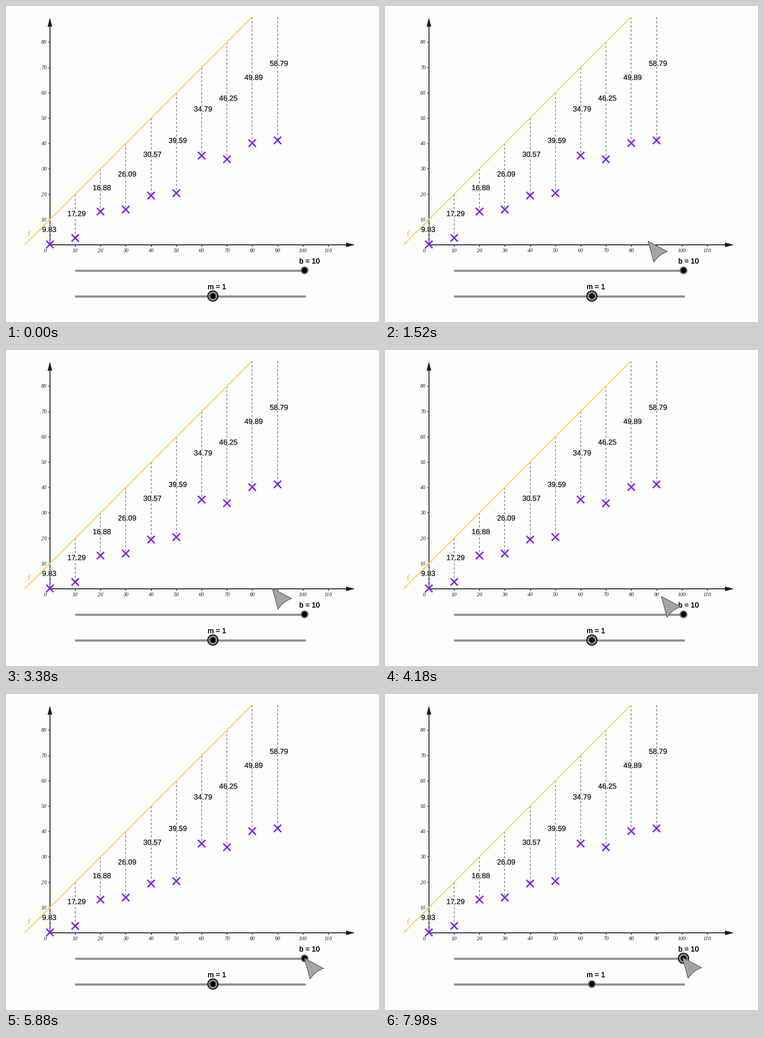
Recreate the animation shown at these times as a matplotlib script. Size 814 px wide and 688 px high, loop 8 s.

```python
import numpy as np
import matplotlib.pyplot as plt
from matplotlib.animation import FuncAnimation
from matplotlib.collections import LineCollection
from matplotlib.patches import Circle, PathPatch, Polygon
from matplotlib.path import Path
from matplotlib.patheffects import Stroke, withStroke

W, H, DPI = 814, 688, 64
PX = 72 / DPI                 # points per pixel
STEP, LOOP = 20, 8000
OX, OY, UNIT = 95.3, 519.5, 5.52
TOP = 23
BG, INK = "#fdfdfb", "#1c1c1c"

fig = plt.figure(figsize=(W / DPI, H / DPI), dpi=DPI, facecolor=BG)
ax = fig.add_axes([0, 0, 1, 1])
ax.set_xlim(-0.5, W - 0.5)    # whole numbers are pixel centres
ax.set_ylim(H - 0.5, -0.5)
ax.axis("off")


def sx(x):
    return OX + UNIT * x


def sy(y):
    return OY - UNIT * y


def lines(segs, color, width, z, cap="butt", style="solid"):
    ax.add_collection(LineCollection(segs, colors=color, linewidths=width * PX,
                                     linestyles=style, capstyle=cap, zorder=z),
                      autolim=False)


def number(x, y, text, ha="center"):
    ax.text(x, y, text, fontsize=12 * PX, color=INK, ha=ha, zorder=3,
            family="Liberation Serif", style="italic")


def label(x, y, text, color="black", z=6):
    effects = [Stroke(linewidth=2.2 * PX, foreground=BG),
               withStroke(linewidth=0.3 * PX, foreground=color)]
    ax.text(x, y, text, fontsize=16 * PX, color=color, zorder=z,
            family="Liberation Sans", path_effects=effects)


def disc(x, y, r, face, edge="none", width=0):
    return ax.add_patch(Circle((x, y), r, facecolor=face, edgecolor=edge,
                               linewidth=width * PX, zorder=9))


# Axes with arrows, ticks and numbers
lines([[(OX, OY), (746, OY)], [(OX, OY), (OX, 40)]], INK, 2, 2)
for (x, y), (dx, dy) in (((761, OY), (1, 0)), ((OX, 25), (0, -1))):
    bx, by = x - 19.5 * dx, y - 19.5 * dy
    ax.add_patch(Polygon([(x, y), (bx + 5 * dy, by + 5 * dx),
                          (bx - 5 * dy, by - 5 * dx)],
                         facecolor=INK, edgecolor="none", zorder=2))

ticks = []
for v in range(10, 120, 10):
    ticks.append([(sx(v), OY), (sx(v), OY + 3.5)])
    number(sx(v), OY + 16, str(v))
    if v < 90:
        ticks.append([(OX - 3.5, sy(v)), (OX, sy(v))])
        number(OX - 7, sy(v) + 4, str(v), "right")
number(OX - 10.5, OY + 16, "0")
lines(ticks, INK, 1.4, 2)

# Line y = x + 10
lines([[(sx(-10), OY), (sx(80), TOP)]], "#fdd264", 2.6, 4)
label(47.5, 501, "f", "#fbc658")

# Data points below the line, each with its labelled distance
gaps = [9.83, 17.29, 16.88, 26.09, 30.57, 39.59, 34.79, 46.25, 49.89, 58.79]
drops, marks = [], []
for i, gap in enumerate(gaps):
    x, top = 10 * i, 10 * i + 10
    px, py = sx(x), sy(top - gap)
    drops.append([(px, max(sy(top), TOP)), (px, py)])
    for s in (-8, 8):
        marks.append([(px - 8, py - s), (px + 8, py + s)])
    label(px - 17, sy(top - gap / 2), f"{gap:.2f}", "#2c2c2c")
lines(drops, "#777777", 1.5, 3, style=(0, (5 / 1.5, 4 / 1.5)))
lines(marks, "#8526ea", 3.2, 5)


def slider(y, knob, color, text):
    """Draw a slider and return the ring that shows it is selected."""
    lines([[(151.5, y), (651.5, y)]], color, 4.6, 7, "round")
    label(knob - 11.5, y - 15, text, z=8)
    disc(knob, y, 8, "#858585", "#666666", 1)
    ring = disc(knob, y, 11.2, "#858585", "black", 2)
    disc(knob, y, 6, "black")
    return ring


b_ring = slider(575, 651, "#918f90", "b = 10")
m_ring = slider(631, 451, "#918b99", "m = 1")

# Mouse pointer, tip at (0, 0): right corner, inward curve, bottom corner
shape = np.array([(0, 0), (42, 22.5), (24, 28), (12.5, 45.5), (0, 0)])
codes = [Path.MOVETO, Path.LINETO, Path.CURVE3, Path.CURVE3, Path.CLOSEPOLY]
pointer = ax.add_patch(PathPatch(Path(shape, codes), facecolor="#a4a4a4",
                                 edgecolor="#5a5a5a", linewidth=1.4 * PX,
                                 joinstyle="round", zorder=10))

OUTSIDE = np.array([840, 700])
REST = np.array([563.5, 504.5])
KNOB = np.array([650.5, 574.5])
GRAB = np.array([648.5, 573])
SELECT_B = 158


def tick_at(ms):
    """The picture refreshes 0, 20 and 120 ms into every 140 ms."""
    cycle, rest = divmod(ms, 140)
    return 3 * cycle + (rest >= 20) + (rest >= 120)


def progress(k, start, end):
    return np.clip((k - start) / (end - start), 0, 1)


def pointer_at(k):
    enter = 1 - (1 - progress(k, 10, 34)) ** 1.33
    drift = progress(k, 52, 116) ** 1.46
    settle = progress(k, 146, 160)
    return (OUTSIDE + (REST - OUTSIDE) * enter + (KNOB - REST) * drift
            + (GRAB - KNOB) * settle)


def update(frame):
    k = tick_at(frame * STEP)
    pointer.set_path(Path(shape + pointer_at(k), codes))
    b_ring.set_visible(k >= SELECT_B)
    m_ring.set_visible(k < SELECT_B)
    return [pointer, b_ring, m_ring]


anim = FuncAnimation(fig, update, frames=LOOP // STEP, interval=STEP,
                     init_func=lambda: update(0), repeat=True,
                     repeat_delay=0, blit=False)
plt.show()
```
